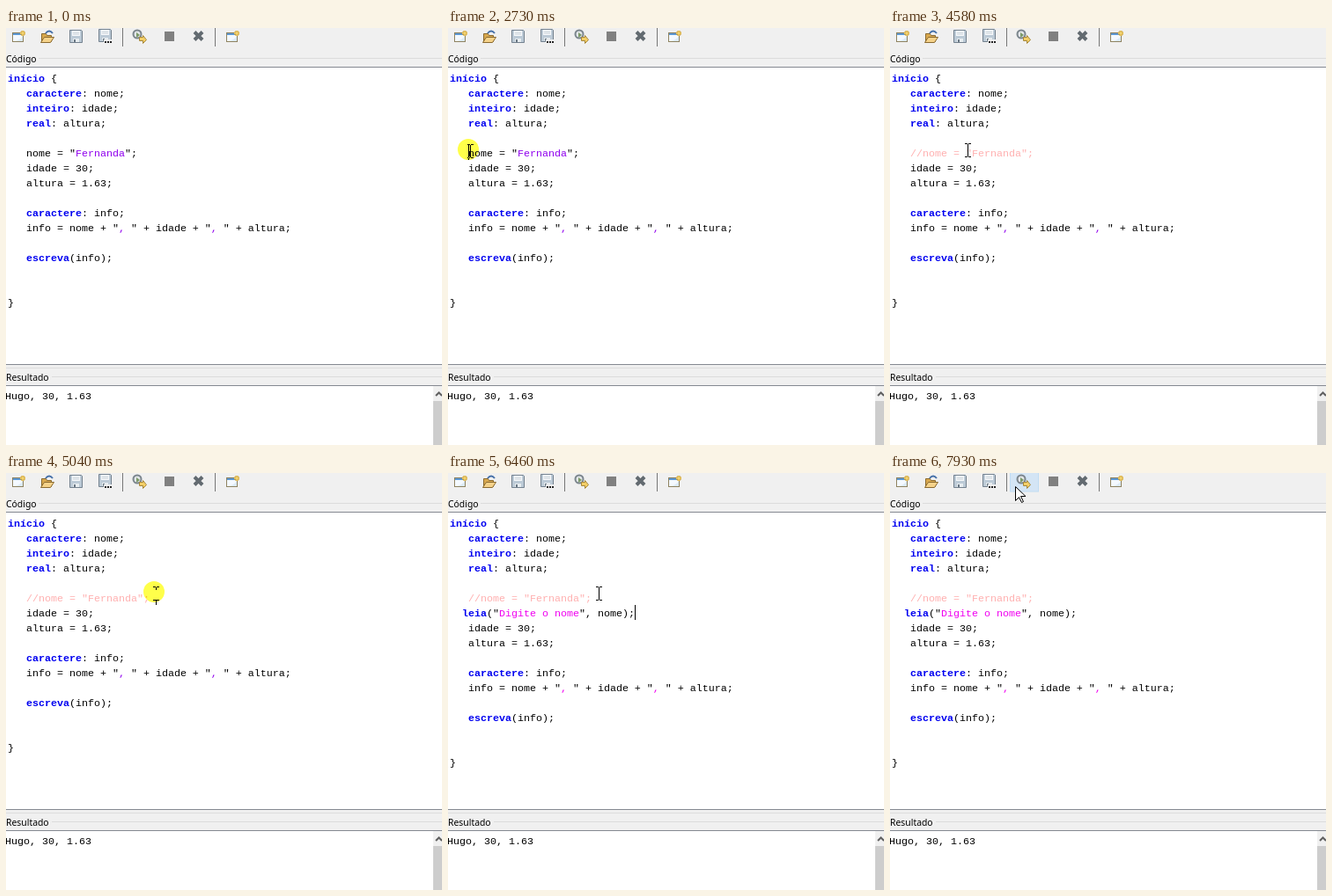
Animation of 495 by 474 pixels, one loop 8 s. Source, as an HTML page with a canvas:

```html
<!DOCTYPE html>
<html lang="pt">
<head>
<meta charset="utf-8">
<style>
html, body { margin: 0; width: 100%; height: 100%; overflow: hidden; background: #fff; }
svg, canvas, pre, #dot { position: absolute; left: 0; top: 0; margin: 0; }
pre { font: 11.667px/17px "Liberation Mono", monospace; color: #000; }
#code { left: 2px; top: 50px; }
#out { left: -1px; top: 411px; }
b { color: #0000f0; }
i { color: #9000ee; font-style: normal; }
.late i { color: #f000f0; }
s { color: #ffafaf; text-decoration: none; }
#dot { width: 24px; height: 24px; border-radius: 50%; background: #ffff4a; mix-blend-mode: multiply; }
text { font: 10.4px "Noto Sans", sans-serif; }
</style>
</head>
<body>
<svg width="495" height="474">
  <defs>
    <g id="window">
      <rect x=".5" y="3.5" width="12" height="10" fill="#f4f9ff" stroke="#8f8360"/>
      <path d="M1 4h11v2h-11z" fill="#5b97d4"/>
      <path d="M3 13q6-1 9-6v6z" fill="#dcebf8"/>
      <path d="M12 1v6M9 4h6" stroke="#c99a2c" stroke-width="3"/>
      <path d="M12 1v6M9 4h6" stroke="#ffe68a"/>
    </g>
    <g id="disk">
      <path d="M.5 .5h13l1 1v13h-14z" fill="#bccad6" stroke="#73818e"/>
      <path d="M3 1h9v6h-9z" fill="#f7f9fb"/>
      <path d="M4 3h7M4 5h7" stroke="#c5ced6"/>
      <path d="M4 10h7v4h-7z" fill="#e8edf0"/>
      <path d="M5 11h2v3h-2z" fill="#6a7884"/>
    </g>
  </defs>
  <path d="M0 0h495v44H0zM0 383h495v23H0z" fill="#f0f0f0"/>
  <path d="M0 44.5h495M0 382.5h495M0 406.5h495" stroke="#858991"/>
  <path d="M37 34.5h458M52 396.5h443M0 386.5h495" stroke="#dcdcdc"/>
  <text x="0" y="39">Código</text>
  <text x="0" y="401">Resultado</text>
  <path d="M485 407h10v67h-10z" fill="#f0f0f0"/>
  <path d="M485 424h10v50h-10z" fill="#cdcdcd"/>
  <path d="M488 418l3.5-3.5 3.5 3.5" fill="none" stroke="#606060" stroke-width="2"/>
  <rect id="hover" x="136.5" y="-1" width="32" height="22" fill="#d4e5f5" stroke="#c0dcf3"/>
  <path d="M132.5 0v21M237.5 0v21" stroke="#777"/>
  <use href="#window" x="7" y="2"/>
  <use href="#window" x="250" y="2"/>
  <g stroke="#8a6a30">
    <path d="M40.500 15.500v-9h5l1 2h5v7z" fill="#d8a84e"/>
    <path d="M39.500 16.500l4-6h11l-4 6z" fill="#f5d28a"/>
    <path d="M45 6q4-5 8 0" fill="none" stroke="#4670a8" stroke-width="2"/>
  </g>
  <use href="#disk" x="72" y="2"/>
  <use href="#disk" x="105" y="1"/>
  <path d="M111 13h10v5h-10z" fill="#f0f0f0"/>
  <path d="M112 16h2m1 0h2m1 0h2" stroke="#222" stroke-width="2"/>
  <circle cx="149" cy="7" r="4.500" fill="#e2e6e8" stroke="#7b858d" stroke-width="2"/>
  <path d="M148 5l4 3-4 3z" fill="#7c9a68"/>
  <path d="M151.500 10.500h4v-2l4 5-4 4v-3h-4z" fill="#f4cf67" stroke="#a5863a"/>
  <path d="M180 4h11v11h-11z" fill="#808080"/>
  <path d="M214 4.500l9 9m0-9l-9 9" stroke="#626a70" stroke-width="4"/>
</svg>
<pre id="code"></pre>
<pre id="out">Hugo, 30, 1.63</pre>
<div id="dot"></div>
<canvas id="top" width="495" height="474"></canvas>
<script>
const $ = id => document.getElementById(id);
const ctx = $('top').getContext('2d');
const LOOP = 8000, STEP = 77, BLINK = 470, CLICK = 200;
const CHAR = 7, LINE = 17;

const head = `início {
   caractere: nome;
   inteiro: idade;
   real: altura;

   `;
const assign = 'nome = "Fernanda";';
const tail = `
   idade = 30;
   altura = 1.63;

   caractere: info;
   info = nome + ", " + idade + ", " + altura;

   escreva(info);


}`;

const edits = [
  { at: 0 },
  { at: 2730, col: 3 },
  { at: 3580, col: 4, slashes: '/' },
  { at: 3750, col: 5, slashes: '//' },
  { at: 5040, col: 24, slashes: '//' },
  { at: 5680, col: 2, slashes: '//', added: '\n' },
  { at: 6460, col: 30, slashes: '//', added: '\n  leia("Digite o nome", nome);' }
];
const clicks = [2730, 5040];

// Pointer glides to (x, y) between two times; equal times make it jump
const moves = [
  { at: 990, end: 990, x: 251, y: 415 },
  { at: 1300, end: 1300, x: 109, y: 86 },
  { at: 1300, end: 1770, x: 5, y: 143 },
  { at: 1770, end: 2010, x: 29, y: 131 },
  { at: 2490, end: 2730, x: 25, y: 132 },
  { at: 4140, end: 4980, x: 170, y: 129 },
  { at: 5240, end: 5240, x: 171, y: 129 },
  { at: 7230, end: 7460, x: 152, y: 38 },
  { at: 7460, end: 7760, x: 142, y: 15 }
];

const smooth = p => p * p * (3 - 2 * p);
const mix = (a, b, p) => Math.round(a + (b - a) * p);

function highlight(src) {
  return src
    .replace(/"([^"]*)"/g, '"<i>$1</i>"')
    .replace(/início|caractere|inteiro|real|escreva|leia/g, '<b>$&</b>')
    .replace(/\/\/nome.*/, line => `<s>${line.replace(/<.*?>/g, '')}</s>`);
}

function pointerAt(t) {
  if (t < 990 || (t >= 1070 && t < 1300)) return null;
  const n = moves.findLastIndex(m => m.at <= t);
  const to = moves[n], from = moves[n - 1] || to;
  const elapsed = Math.floor((t - to.at) / STEP + 0.1) * STEP;
  const p = t >= to.end ? 1 : smooth(Math.min(1, elapsed / (to.end - to.at)));
  return { x: mix(from.x, to.x, p), y: mix(from.y, to.y, p) };
}

function drawBeam(x, y) {
  for (const row of [y, y + 15]) {
    ctx.fillRect(x - 3, row, 3, 1);
    ctx.fillRect(x + 1, row, 3, 1);
  }
  ctx.fillRect(x, y + 1, 1, 14);
}

function drawArrow(x, y) {
  const path = new Path2D('M.5 .5v16l4-4 3 6 2-1-3-6h5.500z');
  ctx.save();
  ctx.translate(x, y);
  ctx.fillStyle = '#fff';
  ctx.fill(path);
  ctx.stroke(path);
  ctx.restore();
}

let shown;
function draw(t) {
  const edit = edits.findLast(e => e.at <= t);
  const { col, slashes = '', added = '' } = edit;
  if (edit !== shown) {
    shown = edit;
    $('code').innerHTML = highlight(head + slashes + assign + added + tail);
    $('code').className = added ? 'late' : '';
  }

  ctx.clearRect(0, 0, 495, 474);
  if (col && (t - edit.at) % (2 * BLINK) < BLINK) {
    ctx.fillRect(2 + col * CHAR, added ? 133 + LINE : 133, 1, LINE);
  }

  const pos = pointerAt(t);
  const arrow = pos && pos.y < 30;
  const clicked = clicks.some(c => t >= c && t < c + CLICK);
  $('hover').style.display = arrow && pos.y < 21 ? '' : 'none';
  $('dot').hidden = !clicked;
  if (clicked) $('dot').style.translate = `${pos.x - 14}px ${pos.y - 6}px`;
  if (!pos) return;
  if (arrow) return drawArrow(pos.x, pos.y);
  // The beam inverts the caret where they overlap
  ctx.globalCompositeOperation = 'xor';
  drawBeam(pos.x, pos.y);
  ctx.globalCompositeOperation = 'source-over';
}

const begin = performance.now();
function tick() {
  draw((performance.now() - begin) % LOOP);
  requestAnimationFrame(tick);
}
tick();
</script>
</body>
</html>
```
